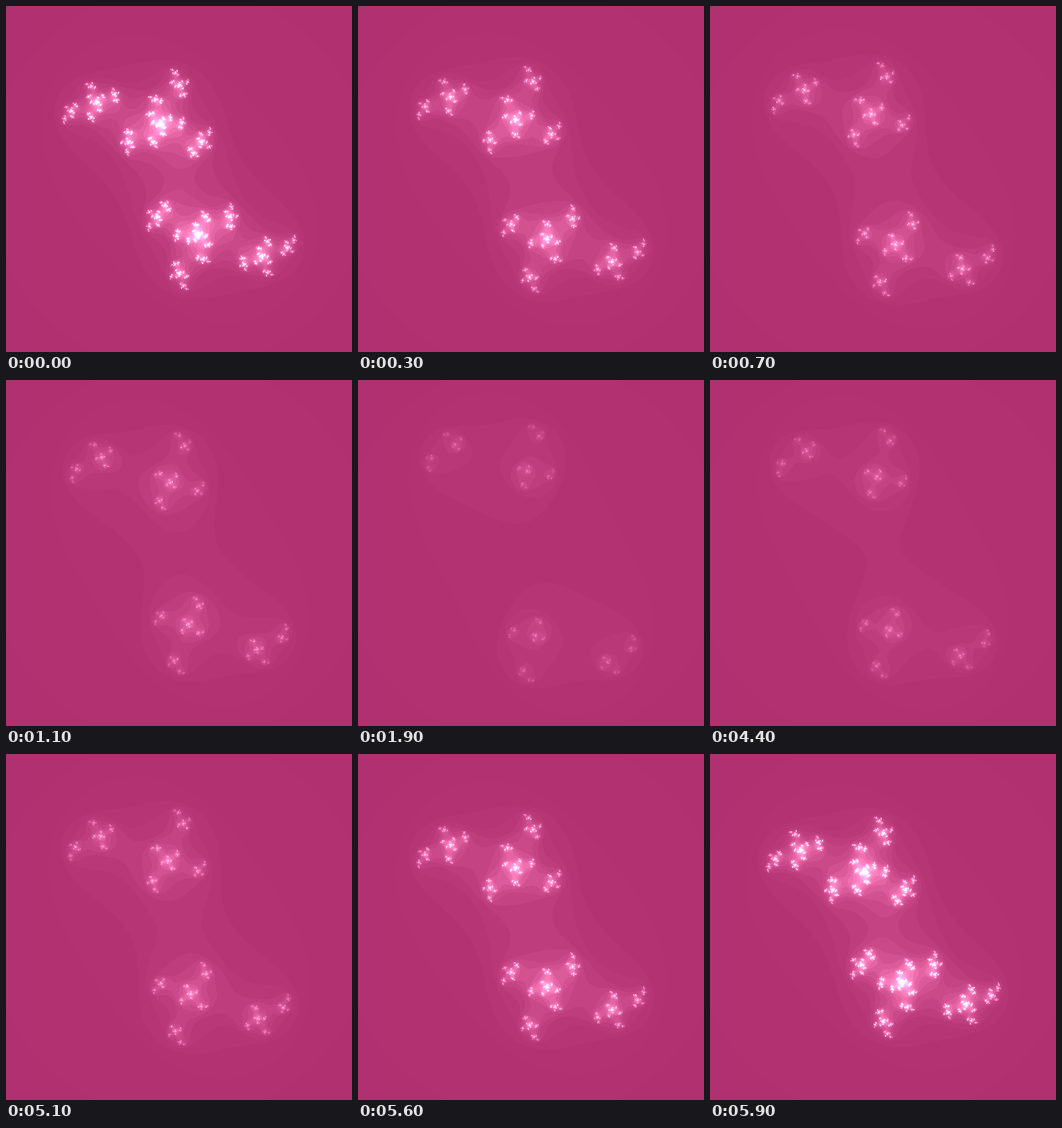
An HTML page with a canvas for the animation above (6000 ms loop, 500x500 px).

```html
<!DOCTYPE html>
<html>
<head>
<meta charset="utf-8">
<title>Julia set</title>
<style>
  html, body { margin: 0; width: 100%; height: 100%; overflow: hidden; background: #b03070; }
  canvas { display: block; }
</style>
</head>
<body>
<canvas id="stage" width="500" height="500"></canvas>
<script>
const SIZE = 500, SPAN = 3.6, MAX_ITER = 40;
const STEP_MS = 100, STEPS = 60;
const C_START = [0.1, -0.8], C_END = [1, -1];
const BASE = [176, 48, 112];

const ctx = document.getElementById('stage').getContext('2d');
const image = ctx.createImageData(SIZE, SIZE);
const pixels = new Uint32Array(image.data.buffer);

// Packed colour for every escape count: the base tint lifted towards white.
const palette = Array.from({ length: MAX_ITER + 1 }, (_, n) => {
  const lift = 207 * (n / 20) ** 2;
  const [r, g, b] = BASE.map(v => Math.min(255, Math.round(v + lift)));
  return (255 << 24 | b << 16 | g << 8 | r) >>> 0;
});

function escapeCount(x, y, cx, cy) {
  let n = 0;
  for (; n < MAX_ITER; n++) {
    const xx = x * x, yy = y * y;
    if (xx + yy > 4) break;
    y = 2 * x * y + cy;
    x = xx - yy + cx;
  }
  return n;
}

function draw(step) {
  const u = Math.min(step, STEPS - 1 - step) / (STEPS / 2 - 1);
  const [cx, cy] = C_START.map((v, i) => v + (C_END[i] - v) * u);
  const toPlane = p => (p / SIZE - 0.5) * SPAN;
  for (let j = 0, i = 0; j < SIZE; j++) {
    for (let k = 0; k < SIZE; k++) {
      pixels[i++] = palette[escapeCount(toPlane(k), toPlane(j), cx, cy)];
    }
  }
  ctx.putImageData(image, 0, 0);
}

let shown = -1;
function tick() {
  const step = Math.floor(performance.now() / STEP_MS) % STEPS;
  if (step !== shown) draw(shown = step);
  requestAnimationFrame(tick);
}
tick();
</script>
</body>
</html>
```
